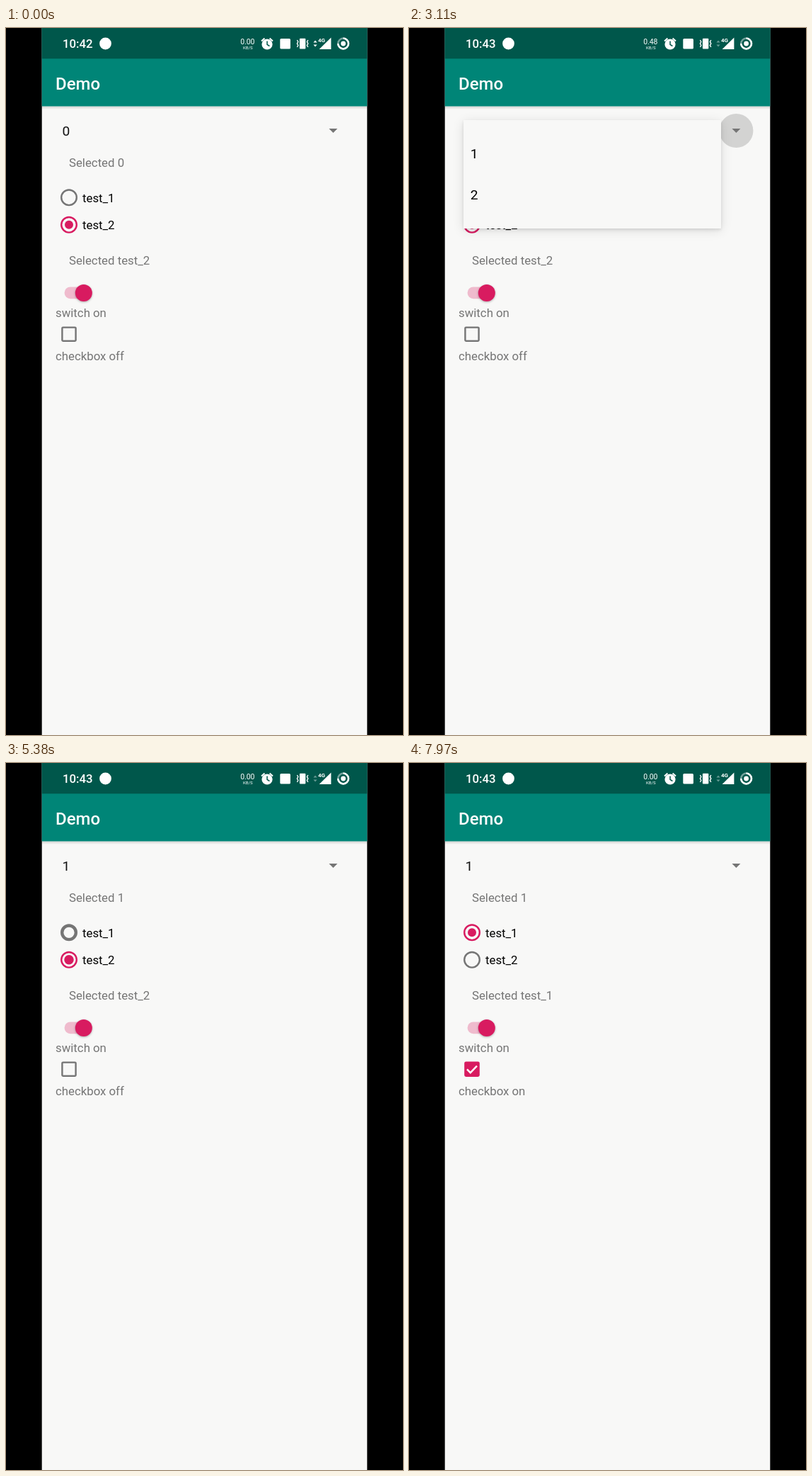
An HTML page for the animation above (8 s loop, 561 by 998 pixels).

```html
<!DOCTYPE html>
<html lang="en">
<head>
<meta charset="utf-8">
<title>Demo</title>
<style>
  html, body { margin: 0; width: 100%; height: 100%; overflow: hidden; background: #000; }
  svg { position: absolute; left: 0; top: 0; }
  text, #popup { font-family: Roboto, "Open Sans", sans-serif; }
  .body { font-size: 16.8px; }
  .item, #popup { font-size: 19.2px; }
  .hint { fill: #757575; }
  .page { fill: #f8f8f7; }
  #popup { position: absolute; top: 130px; width: 364px; overflow: hidden; background: #f8f8f7; }
  #rows { position: absolute; left: 0; top: 0; width: 100%; }
  #rows div { height: 57.6px; line-height: 57.6px; padding-left: 10px; color: #000; }
  #thumb { filter: drop-shadow(0 1.5px 1.5px rgba(0, 0, 0, .3)); }
</style>
</head>
<body>
<svg width="561" height="998" viewBox="0 0 561 998">
  <defs>
    <linearGradient id="shade" x2="0" y2="1">
      <stop stop-color="#000" stop-opacity=".15"/>
      <stop offset="1" stop-color="#000" stop-opacity="0"/>
    </linearGradient>
  </defs>
  <rect width="561" height="998"/>
  <rect class="page" x="50.7" width="459.6" height="998"/>
  <rect x="50.7" y="110.5" width="459.6" height="4.5" fill="url(#shade)"/>
  <rect x="50.7" width="459.6" height="110.5" fill="#008577"/>
  <rect x="50.7" width="459.6" height="43.3" fill="#00574b"/>

  <!-- status bar -->
  <g fill="#fff">
    <text id="clock" class="body" x="80" y="27.6" font-weight="500"></text>
    <circle cx="140.5" cy="22" r="8.4"/>
    <text id="speed" x="341.3" y="22.6" font-size="10.4" text-anchor="middle"></text>
    <text x="341.8" y="29.8" font-size="6" text-anchor="middle">KB/S</text>
    <circle cx="369" cy="23" r="7.6"/>
    <path d="M361 18.4l4.4-3.8M377 18.4l-4.4-3.8" stroke="#fff" stroke-width="2"/>
    <path d="M369 18.5v4.8l3.4 2.2" fill="none" stroke="#00574b" stroke-width="1.5"/>
    <rect x="387.3" y="15" width="14.6" height="14.6" rx="1.5"/>
    <rect x="414.9" y="14.8" width="8.4" height="14.6" rx="1"/>
    <path d="M411.4 17l1.4 2.5-1.4 2.5 1.4 2.5-1.4 2.5M426.8 17l-1.4 2.5 1.4 2.5-1.4 2.5 1.4 2.5"
      fill="none" stroke="#fff" stroke-width="1.4"/>
    <path id="arrows" d="M434.4 20.6l2.6-3 2.6 3zM434.4 23.4l2.6 3 2.6-3z"/>
    <path d="M442.6 30L459.4 13.4V30z"/>
    <text x="441" y="20" font-size="8" font-weight="700" stroke="#00574b" stroke-width="1.6" paint-order="stroke">4G</text>
    <g fill="none" stroke="#fff" stroke-width="2.5">
      <circle cx="476.6" cy="22" r="7.4" opacity=".45"/>
      <path d="M476.6 14.6a7.4 7.4 0 1 1-7.4 7.4"/>
    </g>
    <circle cx="476.6" cy="22" r="3.4"/>
    <text x="70" y="86.7" font-size="24" font-weight="500">Demo</text>
  </g>

  <circle id="ripple"/>

  <!-- controls -->
  <text id="value" class="item" x="79.5" y="152" fill="#111"></text>
  <path d="M456.4 142h12l-6 6z" fill="#757575"/>
  <text id="valueHint" class="body hint" x="89" y="196"></text>
  <g id="radio1" transform="translate(89 239.3)"><circle class="ring" fill="none"/><circle class="dot"/></g>
  <text class="body" x="108" y="245.6">test_1</text>
  <g id="radio2" transform="translate(89 277.8)"><circle class="ring" fill="none"/><circle class="dot"/></g>
  <text class="body" x="108" y="284">test_2</text>
  <text id="radioHint" class="body hint" x="89" y="334"></text>
  <rect id="track" x="82.6" y="365.4" width="30.8" height="16.8" rx="8.4"/>
  <circle id="thumb" cy="374" r="12"/>
  <text id="switchHint" class="body hint" x="70" y="408.3"></text>
  <rect id="box" x="78.2" y="421.4" width="21.6" height="21.6" rx="2.4"/>
  <rect id="hole" class="page"/>
  <path id="tick" d="M82 432.4l4.8 4.8 9.2-9.6" fill="none" stroke="#fff" stroke-width="2.4" pathLength="1" stroke-dasharray="1 1"/>
  <text id="boxHint" class="body hint" x="70" y="469.3"></text>
</svg>
<div id="popup"><div id="rows"><div>0</div><div>1</div><div>2</div><div>3</div><div>4</div></div></div>

<script>
const LOOP = 8000, ACCENT = '#d81b60', GREY = '#757575';
const $ = id => document.getElementById(id);
const clamp = v => Math.max(0, Math.min(1, v));
const lerp = (a, b, k) => a + (b - a) * k;
const decel = k => 1 - (1 - k) ** 2;
const smooth = k => k * k * (3 - 2 * k);
const span = (t, from, length) => clamp((t - from) / length);
const attrs = (el, set) => { for (const name in set) el.setAttribute(name, set[name]); };
const label = (id, text) => { if ($(id).textContent !== text) $(id).textContent = text; };

// press, end of fade, centre (the switch ripple follows its thumb)
const touches = [
  [1620, 2020, 462.4, 145], [2830, 3300, 462.4, 145],
  [4290, 4700, 89, 239.3], [4930, 5330, 89, 277.8], [5460, 5940, 89, 239.3],
  [6350, 6760, 0, 373], [6830, 7250, 0, 373], [7410, 7830, 89, 432]
];
const menus = [
  { open: 1736, press: 2300, close: 2430, end: 2680, pick: 2 },
  { open: 2997, press: 3550, close: 3760, end: 4010, pick: 1 }
];
const radioFlips = [4400, 5030, 5560], switchFlips = [6450, 6930], boxFlips = [7500];

// current state of a toggle and its progress since the last flip
function toggle(t, flips, initial, length) {
  const past = flips.filter(f => f <= t);
  const on = past.length % 2 ? !initial : initial;
  return { on, k: past.length ? span(t, past[past.length - 1], length) : 1 };
}

function drawRadio(group, on, k) {
  const early = k < .4, a = span(k, 0, .4), b = span(k, .4, .6);
  let stroke = 2.4, dot = 0;
  if (on) early ? stroke = lerp(2.4, 12, a) : dot = lerp(9.6, 6, b);
  else early ? dot = lerp(6, 9.6, a) : stroke = lerp(12, 2.4, b);
  const color = on ? ACCENT : GREY;
  attrs(group.querySelector('.ring'), { r: 12 - stroke / 2, stroke: color, 'stroke-width': stroke });
  attrs(group.querySelector('.dot'), { r: dot, fill: color });
}

function drawSwitch(on, k) {
  const p = on ? smooth(k) : 1 - smooth(k), x = lerp(86.3, 109.8, p);
  const mix = [[236, 216], [236, 27], [236, 96]].map(([a, b]) => Math.round(lerp(a, b, p)));
  attrs($('thumb'), { cx: x, fill: `rgb(${mix})` });
  attrs($('track'), { fill: on ? ACCENT : '#000', opacity: on ? .28 : .26 });
  return x;
}

function drawBox(on, k) {
  const side = on ? lerp(16.8, 0, span(k, 0, .45)) : 16.8;
  attrs($('box'), { fill: on ? ACCENT : GREY });
  attrs($('hole'), { x: 89 - side / 2, y: 432.2 - side / 2, width: side, height: side });
  attrs($('tick'), { 'stroke-dashoffset': 1 - span(k, .45, .55), opacity: on && k > .45 ? 1 : 0 });
}

function drawRipple(t, thumbX) {
  const hit = touches.find(([from, to]) => t >= from && t < to);
  if (!hit) return attrs($('ripple'), { r: 0 });
  const [from, to, x, y] = hit;
  attrs($('ripple'), {
    cx: x || thumbX, cy: y, r: 24 * decel(span(t, from, 225)),
    opacity: .15 * span(t, from, 150) * clamp((to - t) / 170)
  });
}

function drawPopup(t) {
  const style = $('popup').style, menu = menus.find(m => t >= m.open && t < m.end);
  style.display = menu ? 'block' : 'none';
  if (!menu) return;
  const u = span(t, menu.open, 250), move = decel(u);
  style.left = lerp(93, 70, move) + 'px';
  style.height = lerp(39, 288, u) + 'px';
  style.opacity = span(t, menu.open, 100) * (1 - span(t, menu.close, menu.end - menu.close));
  style.boxShadow = `0 ${4 * move}px ${22 * move}px rgba(0,0,0,.12), 0 2px 4px rgba(0,0,0,.1)`;
  $('rows').style.top = lerp(-129, 0, move) + 'px';
  [...$('rows').children].forEach((row, i) => {
    const glow = i === menu.pick ? .12 * span(t, menu.press, 120) : 0;
    row.style.background = `rgba(0,0,0,${glow})`;
  });
}

function render(t) {
  label('clock', t < 2830 ? '10:42' : '10:43');
  label('speed', t >= 1000 && t < 4000 ? '0.48' : '0.00');
  attrs($('arrows'), { opacity: t < 2830 ? 1 : .4 });

  const value = menus.reduce((v, m) => t >= m.close ? m.pick : v, 0);
  label('value', `${value}`);
  label('valueHint', `Selected ${value}`);

  const radio = toggle(t, radioFlips, false, 400);
  drawRadio($('radio1'), radio.on, radio.k);
  drawRadio($('radio2'), !radio.on, radio.k);
  label('radioHint', `Selected test_${radio.on ? 1 : 2}`);

  const sw = toggle(t, switchFlips, true, 250);
  const thumbX = drawSwitch(sw.on, sw.k);
  label('switchHint', `switch ${sw.on ? 'on' : 'off'}`);

  const box = toggle(t, boxFlips, false, 450);
  drawBox(box.on, box.k);
  label('boxHint', `checkbox ${box.on ? 'on' : 'off'}`);

  drawRipple(t, thumbX);
  drawPopup(t);
}

const start = performance.now();
function tick() {
  render((performance.now() - start) % LOOP);
  requestAnimationFrame(tick);
}
tick();
</script>
</body>
</html>
```
